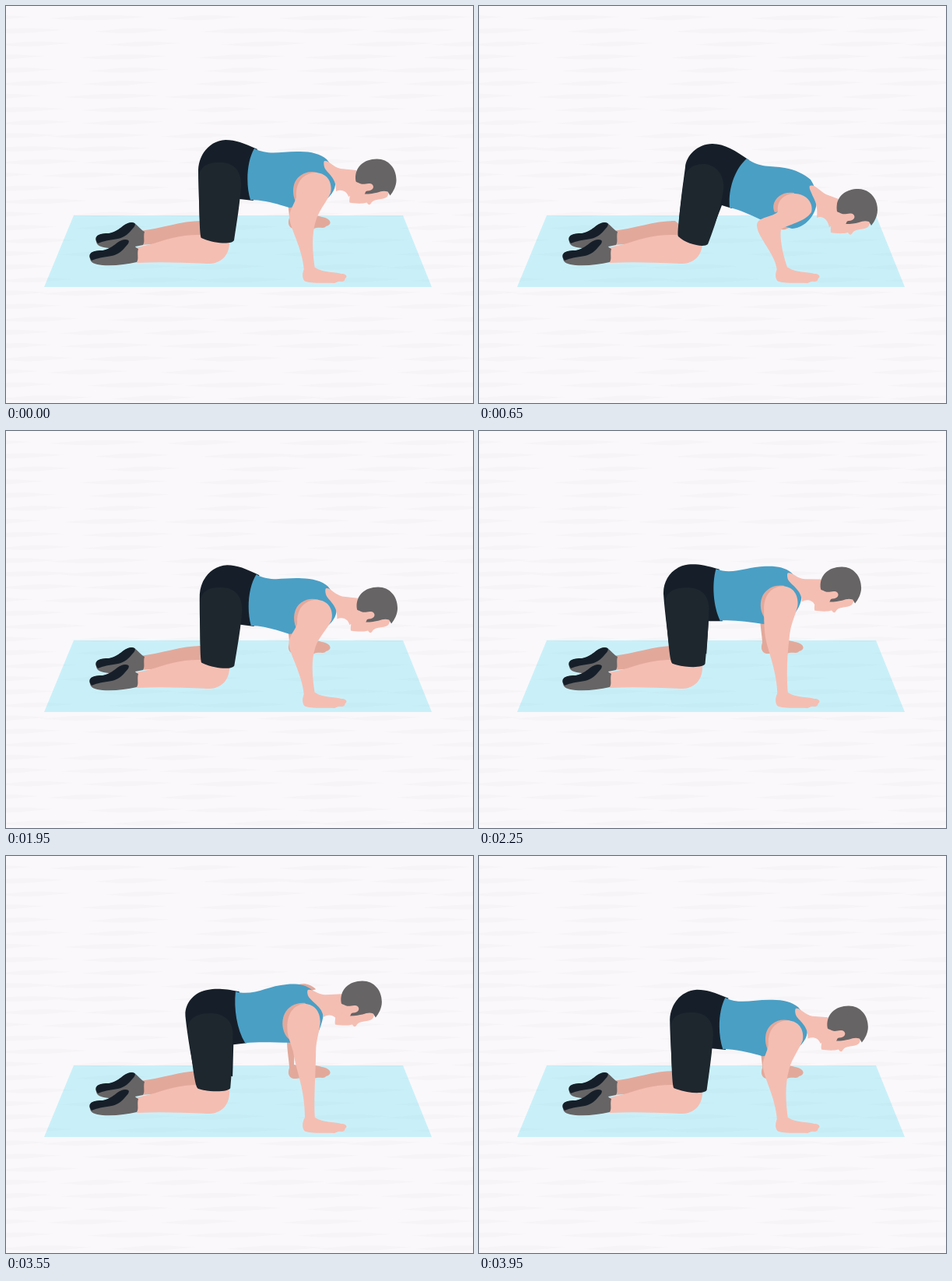
An HTML page for the animation above (4 s loop, 600x510 px).

```html
<!DOCTYPE html>
<html lang="en">
<head>
<meta charset="utf-8">
<title>Kneeling push-up</title>
<style>
html, body { margin: 0; width: 100%; height: 100%; overflow: hidden; background: #faf8fb; }
svg { display: block; width: 100%; height: 100%; }
.skin { fill: #f5beb2; }
.shade { fill: #e2a99b; }
.grey { fill: #666465; }
.dark { fill: #161f29; }
.shorts { fill: #1e272e; }
.shirt { fill: #4a9fc5; }
</style>
</head>
<body>
<svg viewBox="0 0 600 510">
  <rect width="600" height="510" fill="#faf8fb"/>
  <path d="M87 269H510L547 361H49Z" fill="#c9f0f9"/>
  <g id="texture" fill="#565064"></g>

  <path class="shade" d="M172 289C200 286 224 276 252 276L278 300L172 307Z"/>
  <g id="shoe">
    <path class="grey" d="M116 303C114 295 120 292 133 292C146 290 150 279 162 278C168 279 171 286 178 290C176 296 179 303 176 307C162 310 148 312 132 311C122 310 117 308 116 303Z"/>
    <path class="dark" d="M116 302C113 294 122 292 132 292C146 290 150 279 161 278C168 278 167 282 161 288C154 297 146 299 138 300C129 301 123 303 118 305Z"/>
  </g>
  <path class="skin" d="M168 310C190 307 205 298 230 295C250 293 270 294 287 301C288 316 280 330 262 331C230 330 200 328 168 330Z"/>
  <use href="#shoe" x="-8" y="22"/>
  <path class="shade" d="M361 236C361 250 364 265 364 272C361 280 364 287 373 286C383 283 388 290 396 286C402 283 409 287 411 283C420 281 418 273 406 271C396 267 388 271 380 270L370 268L371 236Z"/>
  <g id="body"></g>
  <g id="head">
    <path class="skin" d="M424 182L470 198L472 203C471 208 469 210 459 211C453 212 452 213 450 215C448 219 446 218 444 215C437 217 428 216 422 215C421 211 423 207 422 203Z"/>
    <path class="grey" d="M430 188C427 170 440 159 457 159C472 159 482 171 482 186C482 194 478 201 474 206L471 201C462 198 460 204 441 204L441 195Z"/>
    <path class="skin" d="M432 189C440 194 443 189 450 191C455 194 452 200 445 200C441 200 443 205 439 205L430 203Z"/>
  </g>
  <g id="arm"></g>
</svg>
<script>
const byId = id => document.getElementById(id);

// Each part: layer, class, then its outline in the high, middle and low pose.
const parts = [
  ["body", "shade",
    "M370 166C380 161 390 162 398 170L380 175Z",
    "M380 192C390 192 400 195 405 200L390 205Z",
    "M393 214C403 216 413 220 420 226L400 230Z"],
  ["body", "dark",
    "M299 174C280 170 268 170 258 172C238 176 228 192 230 207C232 225 236 250 240 270L291 283L292 242L309 240C301 222 295 198 299 174Z",
    "M323 184C305 176 295 172 282 172C262 173 248 190 247 210C247 230 248 250 249 275L294 290L300 248L318 250C310 230 314 200 323 184Z",
    "M347 198C330 186 315 177 300 177C280 177 266 193 265 207C262 230 259 250 257 275L297 295L312 256L325 260C322 238 331 212 347 198Z"],
  ["body", "shorts",
    "M233 224C232 208 247 202 262 202C280 202 291 212 291 228C291 255 290 275 288 298C287 303 262 304 247 299C242 297 240 270 233 224Z",
    "M248 222C248 206 258 201 275 201C293 201 303 212 302 232C300 258 296 280 293 301C290 307 266 305 251 298C249 297 248 270 248 222Z",
    "M264 219C268 207 277 203 290 203C306 205 316 218 314 237C310 262 302 285 294 306C289 311 266 306 256 296C254 294 258 262 264 219Z"],
  ["body", "shirt",
    "M294 174C318 180 334 166 360 164C372 163 384 164 392 171C402 180 408 194 407 203C406 214 400 228 396 236L366 239C345 239 325 238 307 240C296 222 292 196 294 174Z",
    "M319 183C338 193 355 186 378 187C392 187 404 190 412 197C420 206 424 220 423 230C422 240 412 250 400 256L364 259C348 254 330 249 314 249C308 230 309 200 319 183Z",
    "M344 196C360 208 375 205 393 208C406 210 418 216 426 223C432 232 436 245 433 258C430 272 416 286 402 286L361 274C348 268 336 262 322 259C320 236 328 210 344 196Z"],
  ["body", "skin",
    "M387 171C393 169 399 177 410 177L431 176L440 195L424 208C420 202 411 202 407 206C406 192 390 186 387 178C386 175 386 172 387 171Z",
    "M409 199C415 198 420 207 430 209L450 211L457 235L440 245C438 237 430 235 424 238C425 220 412 215 409 207C408 203 408 200 409 199Z",
    "M425 231C431 228 438 238 446 242L462 248L470 272L450 284C448 273 440 269 434 272C436 254 430 248 427 240C425 236 424 233 425 231Z"],
  ["arm", "shade",
    "M370 238C356 235 351 215 357 202C362 192 372 187 384 188L384 230Z",
    "M372 251C367 240 368 225 378 218C385 213 392 212 400 214L395 245Z",
    "M380 265C376 258 379 249 386 244C391 240 397 239 405 240L400 262Z"],
  ["arm", "skin",
    "M361 222C360 203 368 190 383 189C396 189 404 200 403 214C402 226 398 236 398 250C398 285 395 315 397 338L384 340C385 300 374 280 369 250C366 240 361 230 361 222Z",
    "M373 245C372 226 382 215 397 214C412 214 420 226 417 240C412 252 402 262 398 276C392 295 394 318 397 338L383 340C381 310 364 285 364 270C365 260 372 252 373 245Z",
    "M384 264C382 250 392 241 406 241C422 242 430 254 427 265C418 278 398 280 388 287C386 297 390 320 397 338L383 340C381 318 358 298 357 282C357 270 378 272 384 264Z"]
];
const headPath = ["M0 0", "M19.5 37.5", "M30 76"];
const MID = 0.48;

function addPath(layer, className, d = "") {
  const path = document.createElementNS("http://www.w3.org/2000/svg", "path");
  path.setAttribute("class", className);
  path.setAttribute("d", d);
  byId(layer).append(path);
  return path;
}

const numbers = d => d.match(/[\d.]+/g).map(Number);

// Smooth curve through the three poses at 0, MID and 1.
function makeBlend(poses) {
  const [high, mid, low] = poses.map(numbers);
  return p => {
    const a = (p - MID) * (p - 1) / MID;
    const b = p * (p - 1) / (MID * (MID - 1));
    const c = p * (p - MID) / (1 - MID);
    return high.map((v, i) => a * v + b * mid[i] + c * low[i]);
  };
}

const moving = parts.map(([layer, className, ...poses]) => ({
  path: addPath(layer, className), shape: poses[0], blend: makeBlend(poses)
}));
addPath("arm", "skin", "M384 336C380 342 380 352 385 354C398 357 410 355 422 356C426 355 426 353 431 354C437 354 434 350 437 349C439 346 435 344 431 344C420 341 408 343 397 336Z");
const headBlend = makeBlend(headPath);

// Faint brushed rows of the paper.
let seed = 17;
const random = () => (seed = seed * 16807 % 2147483647) / 2147483647;
for (let row = 0; row < 31; row++) {
  const y = 14 + row * 16.85;
  for (let x = -40 + (row % 3) * 24; x < 600; x += 105 + random() * 55) {
    const w = 55 + random() * 35;
    const d = `M${x} ${y}q${w / 2} -4 ${w} -1l18 1l-25 2q${-w / 2} 4 ${-w} 1l-16 -1Z`;
    addPath("texture", "", d).setAttribute("opacity", 0.025);
  }
}

// Quick start, steady travel, gentle stop; in steps of 50 ms.
function travel(k, start, slow, end) {
  const speed = 1 / (slow - start / 2 + (end - slow) / 2);
  if (k <= 0) return 0;
  if (k >= end) return 1;
  if (k < start) return speed * k * k / (2 * start);
  if (k < slow) return speed * (k - start / 2);
  return 1 - speed * (end - k) ** 2 / (2 * (end - slow));
}

function depth(ms) {
  const step = Math.floor(ms / 50);
  if (step >= 70) return travel(step - 70, 1.5, 17, 23);
  if (step < 30) return travel(step + 10, 1.5, 17, 23);
  return 1 - travel(step - 30, 1.3, 15, 22);
}

function draw() {
  const p = depth(performance.now() % 4000);
  for (const { path, shape, blend } of moving) {
    const values = blend(p);
    let i = 0;
    path.setAttribute("d", shape.replace(/[\d.]+/g, () => values[i++].toFixed(2)));
  }
  byId("head").setAttribute("transform", `translate(${headBlend(p)})`);
  requestAnimationFrame(draw);
}
draw();
</script>
</body>
</html>
```
